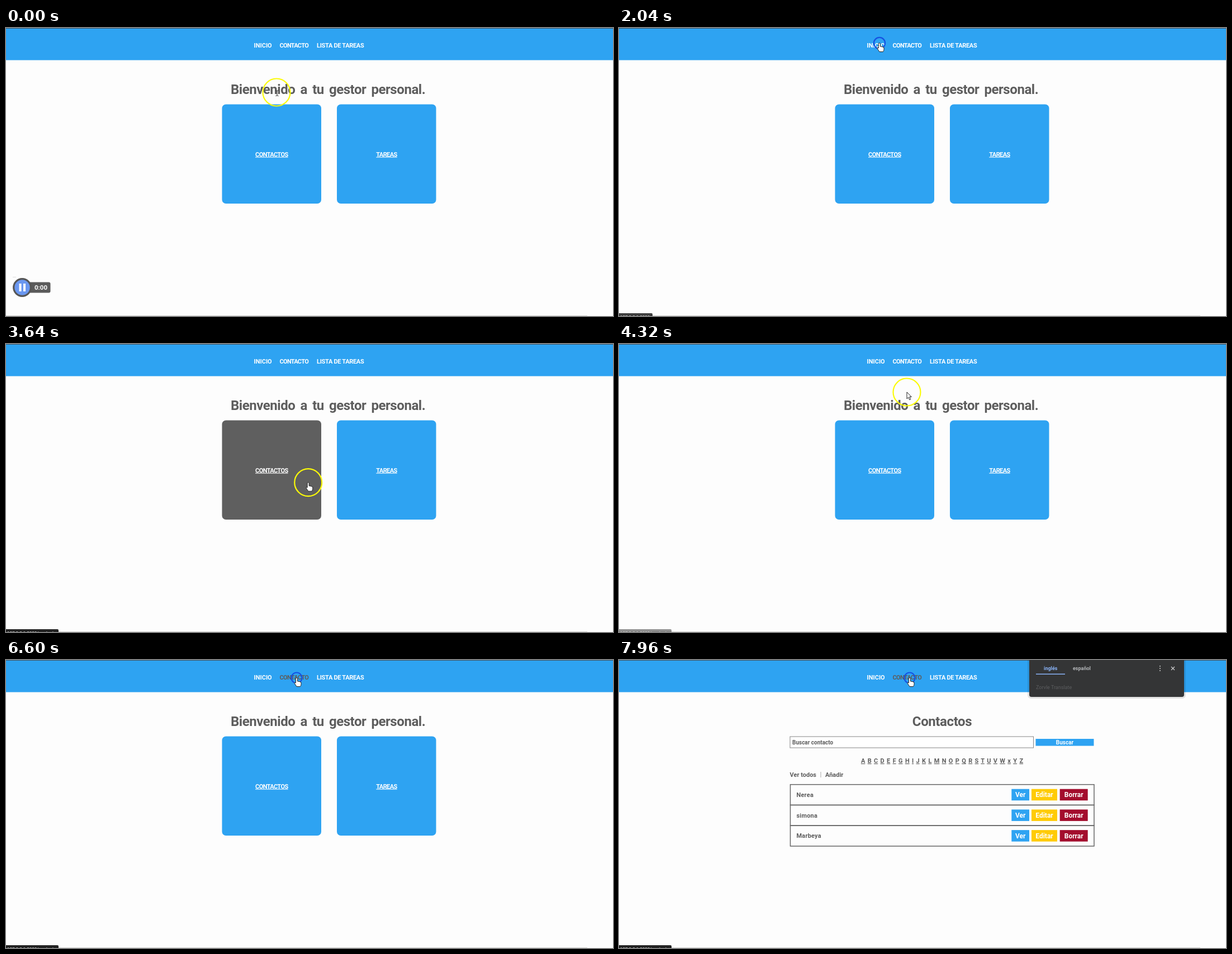
Write an HTML page that moves like this. It is 1086 by 515 pixels and loops after 8000 ms.

```html
<!DOCTYPE html>
<html lang="es">
<head>
<meta charset="utf-8">
<title>Gestor personal</title>
<style>
  html, body { margin: 0; width: 100%; height: 100%; overflow: hidden; background: #fdfdfd; }
  svg { display: block; width: 100%; height: 100%; font: 700 11px Roboto, sans-serif; fill: #5d5d5d; }
  .blue { fill: #2ea3f2; }
  .white { fill: #fff; }
  .mid { text-anchor: middle; }
  .title { font-size: 24px; letter-spacing: -.4px; }
  .link { text-decoration: underline; }
  .card { letter-spacing: -.6px; }
  .btn { font-size: 12px; }
  .small { font-size: 10px; }
  .box { fill: none; stroke: #666; stroke-width: 1.5; }
  #alphabet { word-spacing: 1.6px; }
  .pointer { fill: #fff; stroke: #222; stroke-width: 1; stroke-linejoin: round; }
</style>
</head>
<body>
<svg viewBox="0 0 1086 515">
  <rect width="1086" height="515" fill="#fdfdfd"/>
  <rect class="blue" width="1086" height="57.5"/>
  <rect width="1086" height="1" fill="#45525c"/>
  <rect y="514" width="1040" height="1" fill="#d2d2d0"/>

  <g class="white">
    <text id="inicio" x="443.5" y="34.5">INICIO</text>
    <text id="contacto" x="489.5" y="34.5" letter-spacing="-.7">CONTACTO</text>
    <text x="556" y="34.5" letter-spacing="-.3">LISTA DE TAREAS</text>
  </g>

  <g id="home">
    <text class="title" x="402" y="117.5" style="letter-spacing:-.45px;word-spacing:3.6px">Bienvenido a tu gestor personal.</text>
    <rect id="card" class="blue" x="386.5" y="136.5" width="177.5" height="177.5" rx="7"/>
    <rect class="blue" x="592" y="136.5" width="177.5" height="177.5" rx="7"/>
    <g class="white mid card link">
      <text x="475.3" y="229.5">CONTACTOS</text>
      <text x="681" y="229.5">TAREAS</text>
    </g>
  </g>

  <g id="contacts">
    <text class="title mid" x="578" y="117.5">Contactos</text>
    <rect x="306" y="137" width="435.5" height="20" fill="#fff" stroke="#858585"/>
    <text class="small" x="310" y="150.5">Buscar contacto</text>
    <rect class="blue" x="745.5" y="141" width="104" height="12.5"/>
    <text class="small white mid" x="797.5" y="150.8">Buscar</text>
    <text id="alphabet" class="mid" x="578" y="184"></text>
    <text x="305.5" y="208.5">Ver todos</text>
    <rect x="360.5" y="200" width="1" height="10" fill="#aaa"/>
    <text x="369" y="208.5">Añadir</text>
    <g id="rows"></g>
  </g>

  <g id="timer">
    <rect x="40" y="454.5" width="39.5" height="19" rx="3" fill="#5b5b5b"/>
    <circle cx="29" cy="464" r="15.3" fill="#6a97f0" stroke="#565656" stroke-width="3.2"/>
    <path class="white" d="M23.5 457h4v14h-4zM31 457h4v14h-4z"/>
    <text class="white" x="51" y="468" style="font-size:11.5px">0:00</text>
    <rect x="12" y="445" width="6" height="1" fill="#ddd"/>
  </g>

  <g id="status">
    <path id="statusBar" fill="#222"/>
    <text id="url" x="2" y="519" fill="#eee" style="font-size:8px;font-weight:400"></text>
  </g>

  <g id="popup">
    <rect x="731" y="-6" width="283" height="75" rx="6" fill="#000" opacity=".1"/>
    <rect x="734" y="-6" width="277" height="72" rx="4" fill="#343536"/>
    <rect x="746" y="24.5" width="52" height="1.5" fill="#8ab4f8"/>
    <g style="font-size:9px">
      <text x="760" y="17.5" fill="#8ab4f8">inglés</text>
      <text x="812" y="17.5" fill="#b4b7ba">español</text>
      <text x="746" y="51.5" fill="#5c5d5f" style="font-weight:400">Zorvle Translate</text>
    </g>
    <path d="M968 11v.01M968 15v.01M968 19v.01" stroke="#ccc" stroke-width="2" stroke-linecap="round"/>
    <path d="M988 12l6 6m0-6l-6 6" stroke="#ccc" stroke-width="1.3"/>
  </g>

  <g id="mouse">
    <circle id="ring" fill="none" stroke-width="2.2"/>
    <path id="beam" d="M-2.5-4.5q2.5 0 2.5 1.5V4q0 1.5-2.5 1.5M2.5-4.5Q0-4.5 0-3M0 4q0 1.5 2.5 1.5" fill="none" stroke="#333" transform="translate(1 1)"/>
    <path id="arrow" class="pointer" d="M0 0V12l2.8-2.6 2 4.4 2-.9-2-4.3H8.3z"/>
    <path id="hand" class="pointer" d="M-1.6 9V1.3a1.5 1.5 0 0 1 3 0V6q4 0 6.6 2v3.5q0 2-1.6 4H0q-2-3-4-6.2 0-1.8 2.4-.3z"/>
  </g>
</svg>
<script>
const $ = id => document.getElementById(id);

$('alphabet').innerHTML = [...'ABCDEFGHIJKLMNOPQRSTUVWxYZ']
  .map(c => `<tspan class="link">${c}</tspan>`).join(' ');

const button = (x, y, w, color, label) =>
  `<rect x="${x}" y="${y}" width="${w}" height="20.5" fill="${color}"/>
   <text class="btn white mid" x="${x + w / 2}" y="${y + 14.5}">${label}</text>`;

$('rows').innerHTML = ['Nerea', 'simona', 'Marbeya'].map((name, i) => {
  const y = 222.7 + i * 36.7;
  return `<rect class="box" x="306.5" y="${y}" width="543.5" height="36.7"/>
    <text x="317.5" y="${y + 22.3}" letter-spacing=".2">${name}</text>` +
    button(702.3, y + 8, 31.7, '#2ea3f2', 'Ver') +
    button(738, y + 8, 46, '#ffcb05', 'Editar') +
    button(788.7, y + 8, 50, '#a30d2d', 'Borrar');
}).join('');

// Pointer path: time, x, y, and an optional bend on the way there
const path = [
  [0, 484, 115], [40, 484, 115], [840, 465, 28, 590, 70],
  [2040, 466, 27], [2680, 488, 53, 588, 60], [2960, 488, 53],
  [3040, 484, 146], [3720, 544, 250, 500, 220], [3880, 544, 250],
  [4080, 514, 83], [4240, 514, 83], [4320, 515, 86],
  [5040, 520, 32, 522, 60], [8000, 520, 32]
];

const ramp = (t, a, b) => Math.min(1, Math.max(0, (t - a) / (b - a)));
const mix = (a, b, k) => a + (b - a) * k;
const blend = (a, b, k) => `rgb(${a.map((v, i) => Math.round(mix(v, b[i], k)))})`;
const show = (id, on) => $(id).setAttribute('opacity', +on);
const WHITE = [255, 255, 255], GREY = [93, 93, 93];

function pointer(t) {
  const i = path.findIndex(p => p[0] > t);
  const [t0, x0, y0] = path[i - 1];
  const [t1, x1, y1, cx = (x0 + x1) / 2, cy = (y0 + y1) / 2] = path[i];
  const u = ramp(t, t0, t1), k = u * u * (3 - 2 * u);
  const bend = (a, c, b) => mix(mix(a, c, k), mix(c, b, k), k);
  return [bend(x0, cx, x1), bend(y0, cy, y1)];
}

function draw(t) {
  const [x, y] = pointer(t);
  const over = (l, top, r, bottom) => x > l && x < r && y > top && y < bottom;
  const home = t < 7600;
  const onInicio = over(443, 21, 477, 39), onContacto = over(489, 21, 543, 39);
  const onCard = home && over(386, 137, 564, 314);
  const onTitle = home && over(402, 96, 753, 122);
  const onLink = onInicio || onContacto || onCard;

  show('home', home);
  show('contacts', !home);
  $('inicio').style.fill = blend(WHITE, GREY, onInicio * (1 - ramp(t, 1760, 1880)));
  $('contacto').style.fill = blend(WHITE, GREY, +onContacto);
  $('card').style.fill = onCard ? '#5f5f5f' : '';
  show('timer', 1 - ramp(t, 320, 520));
  show('popup', ramp(t, 7840, 7920));

  const long = t > 2800, w = long ? 94 : 60;
  $('statusBar').setAttribute('d', `M0 510H${w - 2}q2 0 2 2v3H0z`);
  $('url').textContent = '127.0.0.1:8000' + (long ? '/contacto' : '');
  show('status', ramp(t, 720, 840) - ramp(t, 2020, 2180) + ramp(t, 3080, 3240)
    - ramp(t, 4240, 4400) + ramp(t, 4840, 5000));

  const press = ramp(t, 880, 960) - ramp(t, 2040, 2120) + ramp(t, 5320, 5480);
  $('ring').setAttribute('r', mix(24.5, 9.5, press ** 3));
  $('ring').setAttribute('stroke', blend([251, 251, 8], [20, 80, 228], press));
  $('mouse').setAttribute('transform', `translate(${x} ${y})`);
  show('hand', onLink);
  show('beam', onTitle);
  show('arrow', !onLink && !onTitle);
}

function tick() {
  draw(performance.now() % 8000);
  requestAnimationFrame(tick);
}
tick();
</script>
</body>
</html>
```
